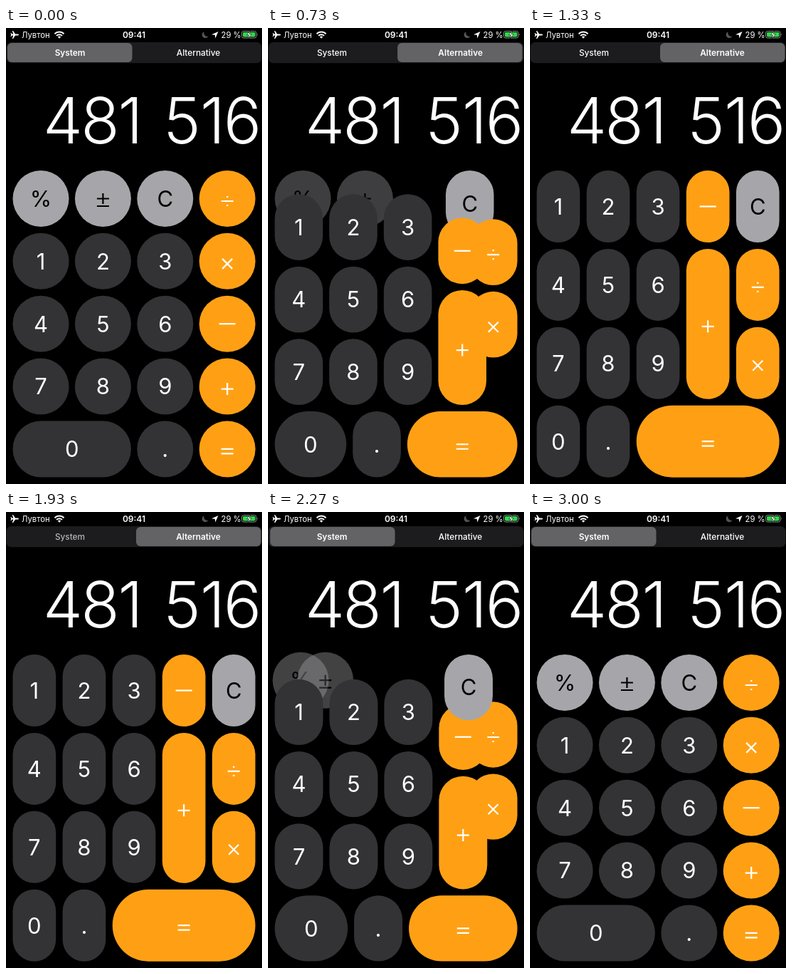
Recreate the animation shown at these times as an HTML page. Size 360 by 640 pixels, loop 3030 ms.

```html
<!DOCTYPE html>
<html lang="en">
<head>
<meta charset="utf-8">
<title>Calculator layouts</title>
<style>
  html, body { margin: 0; width: 100%; height: 100%; overflow: hidden; background: #000; }
  svg { display: block; width: 360px; height: 640px; font-family: Inter, Roboto, "Liberation Sans", sans-serif; }
  text { fill: #fff; }
  .mid { text-anchor: middle; }
  .status { font-size: 11.3px; }
  .display { font-size: 89px; font-weight: 300; text-anchor: middle; }
  .tab { font-size: 11.8px; text-anchor: middle; font-weight: 500; }
  .key { font-size: 31px; text-anchor: middle; }
  .dark { fill: #333336; }
  .light { fill: #a6a6aa; }
  .accent { fill: #ffa014; }
  .light + text { fill: #000; }
  .sign { fill: none; stroke: #fff; stroke-width: 2.2; }
  .light + .sign { stroke: #000; }
</style>
</head>
<body>
<svg viewBox="0 0 360 640">
  <rect width="360" height="640"/>

  <g fill="#fff">
    <path d="M18 9.500q0-1-2-1h-3L10 4H8.800l1.500 4.500H8.500L7.300 7H6.500l.7 2.500-.7 2.500h.8l1.200-1.500h1.800L8.800 15H10l3-4.500h3q2 0 2-1z"/>
    <text class="status" x="22" y="13.800">Лувтон</text>
    <g fill="none" stroke="#fff" stroke-width="2">
      <path d="M68.500 8.300a9 9 0 0 1 13 0M71 10.900a5.700 5.700 0 0 1 8 0"/>
    </g>
    <path d="M75 14.800l-2.200-2.300a3.300 3.300 0 0 1 4.400 0z"/>
    <text class="mid" x="180" y="14" font-size="12" font-weight="600">09:41</text>
    <path fill="#555558" d="M278.500 5.300a4.600 4.600 0 1 0 5.900 6.200a4.800 4.800 0 0 1-5.900-6.200z"/>
    <path d="M298.500 5l-4.200 9.500-.5-4.800-4.800-.5z"/>
    <text class="status" x="302.500" y="13.800">29 %</text>
    <rect x="331.500" y="4.500" width="20.500" height="9.500" rx="2.600" fill="none" stroke="#8d8d90"/>
    <rect x="333" y="6" width="17.500" height="6.500" rx="1.400" fill="#32d74b"/>
    <path d="M353.300 7.500q1.700 1.700 0 3.500z" fill="#8d8d90"/>
    <path d="M343.500 4l-5 5.800h3l-1.200 5 5.200-6.200h-3.200z" stroke="#000" stroke-width=".6"/>
  </g>

  <rect x=".5" y="20" width="359" height="29.300" rx="7" fill="#1c1c1f"/>
  <rect id="pill" y="21" width="175.500" height="27" rx="6" fill="#636366"/>
  <text id="system" class="tab" x="90" y="38.500">System</text>
  <text id="alternative" class="tab" x="270.500" y="38.500">Alternative</text>

  <text class="display" x="80 132.500 175 248 290.500 332.500" y="162">481516</text>
  <g id="keys"></g>
</svg>
<script>
const LOOP = 3030;
const MOVE = 330;
const FORWARD = { tap: 393, move: 539 };
const BACK = { tap: 1940, move: 2129 };
const byId = id => document.getElementById(id);

const clamp = v => Math.max(0, Math.min(1, v));
const mix = (a, b, p) => a + (b - a) * p;
const ease = v => { v = clamp(v); return v * v * (3 - 2 * v); };
const spring = ms => {
  const s = Math.max(0, ms) * 0.022;
  return 1 - (1 + s) * Math.exp(-s);
};

// Grid cells as [x, y, width, height]
const grid = (pitchX, w, pitchY, h) => (col, row, cols = 1, rows = 1) => [
  9.5 + col * pitchX, 200 + row * pitchY,
  w + (cols - 1) * pitchX, h + (rows - 1) * pitchY
];
const square = grid(87.4, 79, 87.85, 79);
const tall = grid(70.1, 60.7, 109.9, 101);

const signs = {
  '÷': 'M-8.500 3.500h17M-1.200 -2.500h2.400M-1.200 9.500h2.400',
  '×': 'M-7 -3.500l14 14M7 -3.500l-14 14',
  '−': 'M-11.500 0h23',
  '+': 'M-8.500 3.500h17M0 -5v17',
  '=': 'M-8.500 0h17M-8.500 6.500h17',
  '±': 'M-8.500 0h17M0 -7.500v15M-8.500 10.500h17'
};

const keys = [];
function addKey(label, style, from, to) {
  const group = document.createElementNS('http://www.w3.org/2000/svg', 'g');
  const face = signs[label]
    ? `<path class="sign" d="${signs[label]}"/>`
    : `<text class="key" y="11.300">${label}</text>`;
  group.innerHTML = `<rect class="${style}"/>${face}`;
  byId('keys').append(group);
  const key = { group, from, to, rect: group.firstChild, face: group.lastChild };
  keys.push(key);
  return key;
}

addKey('%', 'light', square(0, 0));
addKey('±', 'light', square(1, 0));
const clearKey = addKey('C', 'light', square(2, 0), tall(4, 0));
for (let n = 0; n < 9; n++) {
  const col = n % 3, row = Math.floor(n / 3);
  addKey(n + 1, 'dark', square(col, row + 1), tall(col, row));
}
addKey('0', 'dark', square(0, 4, 2), tall(0, 3));
addKey('.', 'dark', square(2, 4), tall(1, 3));
addKey('÷', 'accent', square(3, 0), tall(4, 1));
addKey('×', 'accent', square(3, 1), tall(4, 2));
addKey('−', 'accent', square(3, 2), tall(3, 0));
addKey('+', 'accent', square(3, 3), tall(3, 1, 1, 2));
addKey('=', 'accent', square(3, 4), tall(2, 3, 3));
const afterClear = clearKey.group.nextSibling;

function placeKey({ group, rect, face, from, to }, p, returning) {
  // Keys missing from the tall layout fade out in place and return from the corner.
  const end = to || (returning ? [4.5, 194.5, 79, 79] : from);
  const [x, y, w, h] = from.map((v, i) => mix(v, end[i], p));
  const box = { x, y, width: w, height: h, rx: Math.min(w, h) / 2 };
  for (const name in box) rect.setAttribute(name, box[name]);
  face.setAttribute('transform', `translate(${x + w / 2} ${y + h / 2})`);
  if (!to) group.setAttribute('opacity', 1 - p);
}

function drawTab(id, selected, pressedFor, shift = 0) {
  const tab = byId(id);
  const pressed = pressedFor > -110 && pressedFor < 0;
  tab.style.fontWeight = selected ? 600 : 500;
  tab.setAttribute('opacity', pressed ? mix(1, 0.68, clamp((pressedFor + 110) / 80)) : 1);
  tab.setAttribute('transform', `translate(${shift} 0)`);
}

function render(t) {
  const slide = spring(t - FORWARD.tap) * (1 - spring(t - BACK.tap));
  byId('pill').setAttribute('x', mix(2, 183, slide));
  const onSystem = t < FORWARD.tap || t >= BACK.tap;
  const nudge = t < BACK.tap ? 20 * slide * (1 - slide) : 0;
  drawTab('system', onSystem, t - BACK.tap);
  drawTab('alternative', !onSystem, t - FORWARD.tap, nudge);

  const returning = t >= BACK.move;
  const p = returning ? 1 - ease((t - BACK.move) / MOVE) : ease((t - FORWARD.move) / MOVE);
  byId('keys').insertBefore(clearKey.group, returning ? null : afterClear);
  keys.forEach(key => placeKey(key, p, returning));
}

const start = performance.now();
function tick() {
  render((performance.now() - start) % LOOP);
  requestAnimationFrame(tick);
}
tick();
</script>
</body>
</html>
```
